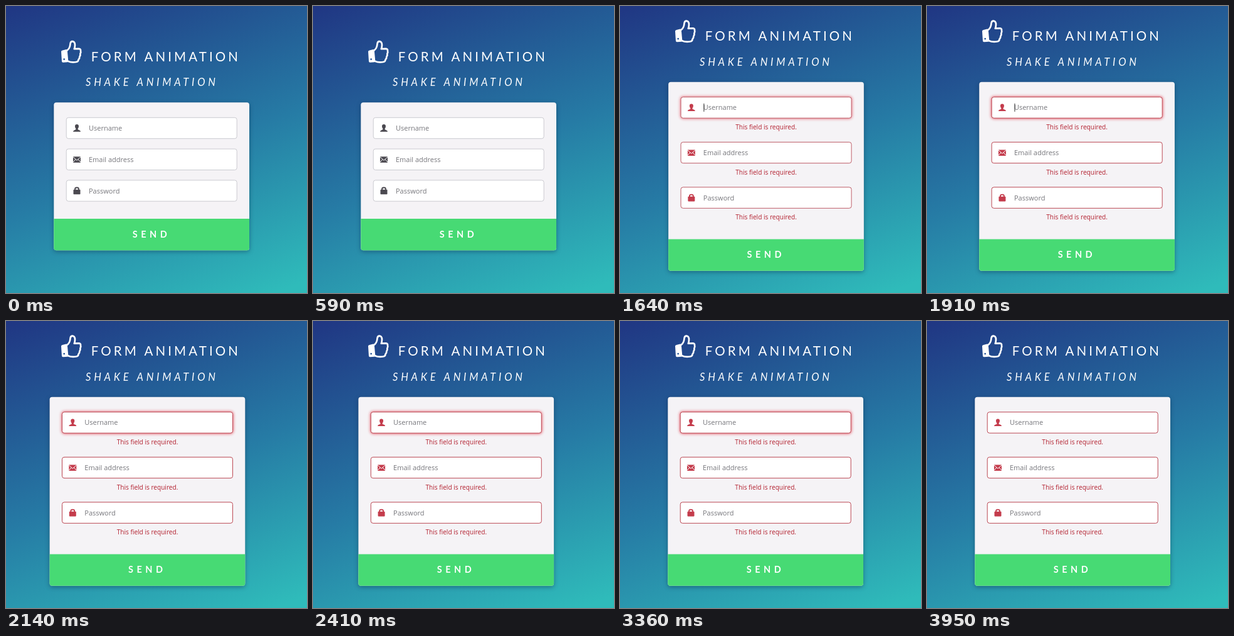
Recreate the animation shown at these times as an HTML page. Size 480 px wide and 456 px high, loop 3.99 s.

```html
<!DOCTYPE html>
<html lang="en">
<head>
<meta charset="utf-8">
<title>Form animation</title>
<style>
  html, body { margin: 0; width: 100%; height: 100%; overflow: hidden; }
  body { background: linear-gradient(160deg, #203683 0%, #267ba5 53%, #2fbbba 97%); }
  svg { display: block; width: 100vw; height: 100vh; }
  text { font-family: "Open Sans", "Noto Sans", sans-serif; }
  .heading, .send { font-family: Lato, "Open Sans", sans-serif; fill: #fff; }
  .title { font-size: 20.5px; letter-spacing: 4.1px; }
  .subtitle { font-size: 16.5px; font-style: italic; letter-spacing: 4.75px; }
  .send { font-size: 14.5px; font-weight: 700; letter-spacing: 5.5px; }
  .label { font-size: 11px; fill: #77777c; }
  .error { font-size: 10.1px; font-weight: 500; fill: #b3202f; text-anchor: middle; }
  .box { fill: #fff; stroke-width: 1; }
  .shadow { filter: drop-shadow(0 2px 3.5px rgba(0, 20, 50, .38)); }
  .glow { fill: #e03848; filter: blur(2px); }
</style>
</head>
<body>
<svg viewBox="0 0 480 456" preserveAspectRatio="none">
  <g id="header">
    <path d="M90 70.5 L96 69 Q97.6 69 97.8 70.8 L99.3 87.2 Q99.3 89 97.6 89.2 L91 89.7 Q89.2 89.7 89 88 L88 72.6 Q88 71 90 70.5Z" fill="#fff"/>
    <circle cx="92.7" cy="84.6" r="1.4" fill="#29579a"/>
    <path d="M97.5 70.5 C101 68 102.2 65 102.5 60 Q103 56.2 106 56.2 Q110 56.8 110 62 Q110 65.5 108.8 68.2 L116.3 67.8 Q119.4 68.2 119 71.2 Q119.8 73.5 118.4 75.8 Q119 78.4 117.3 80.7 Q117.6 83.3 115.6 85 Q115.4 88.6 111.8 89 C107 89.7 103 89.7 99 87.7" fill="none" stroke="#fff" stroke-width="2.7" stroke-linejoin="round" stroke-linecap="round"/>
    <text class="heading title" x="135.7" y="87.5">FORM ANIMATION</text>
    <text class="heading subtitle" x="127" y="127">SHAKE ANIMATION</text>
  </g>
  <g id="card">
    <rect id="panel" class="shadow" x="76.3" width="311.7" rx="4" fill="#f5f3f6"/>
    <g id="fields"></g>
    <g id="footer">
      <path d="M76.3 338H388V384.2a4 4 0 0 1-4 4H80.3a4 4 0 0 1-4-4Z" fill="#47da74"/>
      <text class="send" x="201.7" y="367.7">SEND</text>
    </g>
  </g>
</svg>
<script>
const LOOP = 3990;
const SHAKE_START = 1515, SHAKE_TIME = 958, SHAKE_STEPS = 10, SHAKE_SIZE = 10;
const BLUR_START = 3760, FADE = 150, BLINK = 500;
const SHIFT = 32.5;
const GREY = [202, 202, 208], RED = [187, 70, 82];
const byId = id => document.getElementById(id);
const clamp = v => Math.min(1, Math.max(0, v));

// Icons are centred on the origin.
const icons = {
  user: `<path d="M0-6C2.3-6 3.2-4.5 3-2.4Q2.7-.2 1.6.9V2Q2.2 2.8 4.3 3.4Q6 4 6 5.7H-6Q-6 4-4.3 3.4Q-2.2 2.8-1.6 2V.9Q-2.7-.2-3-2.4C-3.2-4.5-2.3-6 0-6Z"/>`,
  mail: `<path d="M-6-4.5H6V5H-6Z"/><path d="M-6-4L0 1.5L6-4M-6 4.3L-2-.2M6 4.3L2-.2" fill="none" stroke="#fff"/>`,
  lock: `<rect x="-5.5" y="-1.8" width="11" height="7.6" rx=".8"/><path d="M-2.9-1V-3Q-2.9-5 0-5T2.9-3V-1" fill="none" stroke="currentColor" stroke-width="1.9"/>`
};

const fields = [
  { label: "Username", icon: "user", idleY: 177, errorY: 144.4 },
  { label: "Email address", icon: "mail", idleY: 226.8, errorY: 216 },
  { label: "Password", icon: "lock", idleY: 276.5, errorY: 287.6 }
];

byId("fields").innerHTML = fields.map(({ label, icon }, i) => `
  <g class="field">
    ${i ? "" : '<rect id="glow" class="glow" x="95" y="-1" width="274.5" height="36" rx="5"/>'}
    <rect class="box" x="96.2" y=".3" width="272" height="33.4" rx="3.5"/>
    <g class="icon" transform="translate(113 17)" fill="currentColor">${icons[icon]}</g>
    <text class="label" x="132" y="21">${label}</text>
    <text class="error" x="232.2" y="51.7">This field is required.</text>
    ${i ? "" : '<path id="caret" d="M133 10.5V23.5" stroke="#333"/>'}
  </g>`).join("");

const groups = [...document.querySelectorAll(".field")];
const show = (el, on) => el.setAttribute("visibility", on ? "visible" : "hidden");
const move = (el, x, y) => el.setAttribute("transform", `translate(${x} ${y})`);
const mix = (a, b, p) => `rgb(${a.map((v, i) => Math.round(v + (b[i] - v) * p))})`;

// CSS "ease": cubic-bezier(.25, .1, .25, 1)
function ease(x) {
  const bezier = (a, b, s) => 3 * a * s * (1 - s) ** 2 + 3 * b * s * s * (1 - s) + s ** 3;
  let low = 0, high = 1;
  for (let i = 0; i < 20; i++) {
    const mid = (low + high) / 2;
    if (bezier(.25, .25, mid) < x) low = mid; else high = mid;
  }
  return bezier(.1, 1, low);
}

function shakeOffset(t) {
  const step = (t - SHAKE_START) / SHAKE_TIME * SHAKE_STEPS;
  if (step <= 0 || step >= SHAKE_STEPS) return 0;
  const stop = n => n === 0 || n === SHAKE_STEPS ? 0 : n % 2 ? -SHAKE_SIZE : SHAKE_SIZE;
  const n = Math.floor(step);
  return stop(n) + (stop(n + 1) - stop(n)) * ease(step - n);
}

function draw(t) {
  const failed = t >= SHAKE_START;
  const shift = failed ? SHIFT : 0;
  const redness = clamp((t - SHAKE_START) / FADE);
  const focus = redness * (1 - clamp((t - BLUR_START) / FADE));
  const caretOn = failed && t < BLUR_START && Math.floor((t - SHAKE_START) / BLINK) % 2 === 0;

  move(byId("header"), 0, -shift);
  move(byId("card"), shakeOffset(t), 0);
  move(byId("footer"), 0, shift);
  byId("panel").setAttribute("y", 153.3 - shift);
  byId("panel").setAttribute("height", 234.9 + 2 * shift);

  groups.forEach((group, i) => {
    move(group, 0, failed ? fields[i].errorY : fields[i].idleY);
    group.querySelector(".box").setAttribute("stroke", mix(GREY, RED, redness));
    group.querySelector(".icon").style.color = failed ? "#c43c4c" : "#4b4950";
    show(group.querySelector(".error"), failed);
  });
  byId("glow").setAttribute("opacity", focus * .75);
  show(byId("caret"), caretOn);
}

const start = performance.now();
function tick() {
  draw((performance.now() - start) % LOOP);
  requestAnimationFrame(tick);
}
tick();
</script>
</body>
</html>
```
